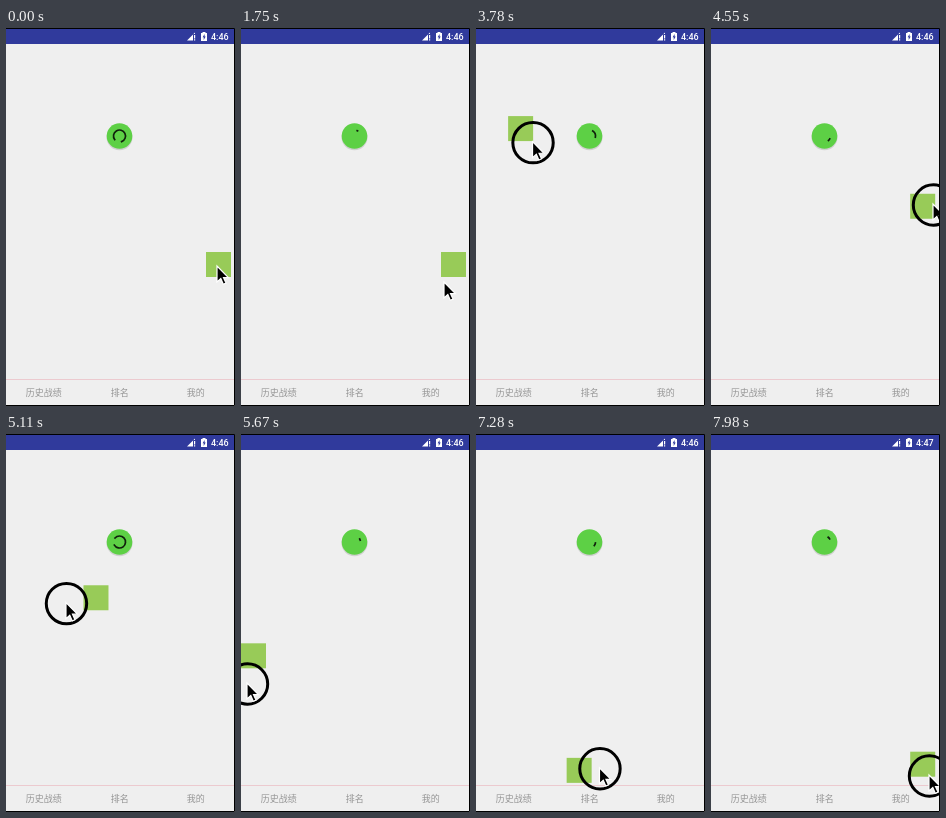
An HTML page that plays this animation: 229 by 378 pixels, repeating every 8 s.

```html
<!DOCTYPE html>
<html lang="zh">
<head>
<meta charset="utf-8">
<style>
  html, body { margin: 0; width: 100%; height: 100%; overflow: hidden; background: #efefef; }
  svg { display: block; width: 229px; height: 378px; }
  .nav { font: 9px "Noto Sans CJK SC", "Noto Sans CJK", sans-serif; fill: #959595; text-anchor: middle; }
  #clock { font: 500 9px Roboto, sans-serif; fill: #fff; }
</style>
</head>
<body>
<svg viewBox="0 0 229 378">
  <rect width="229" height="378" fill="#efefef"/>
  <rect width="229" height="16" fill="#303a9c"/>

  <g fill="#fff">
    <path d="M181 12.5L189 4.5V6H187V12.5Z"/>
    <path d="M188 7h1.2v3.5H188zM188 11.3h1.2v1.2H188z"/>
    <path d="M195 5h1.5V4h3v1h1.5v8h-6z"/>
    <path d="M198.6 6L196.6 9.2h1.1V12l2-3.5h-1.1z" fill="#303a9c"/>
    <text id="clock" x="205" y="12">4:46</text>
  </g>

  <rect y="351" width="229" height="1" fill="#eccacf"/>
  <g class="nav">
    <text x="37.7" y="368">历史战绩</text>
    <text x="113.7" y="368">排名</text>
    <text x="189.7" y="368">我的</text>
  </g>

  <circle cx="113.5" cy="109.2" r="13" fill="#000" opacity=".13"/>
  <circle cx="113.5" cy="108" r="12.8" fill="#5dd045"/>
  <path id="arc" fill="none" stroke="#10200c" stroke-width="1.7" stroke-linecap="square"/>

  <rect id="badge" width="25" height="25" fill="#98cb58"/>
  <circle id="touch" cx=".5" r="20.2" fill="none" stroke="#000" stroke-width="3"/>
  <path id="pointer" d="M0 -1V15L3.8 11.6 6.3 17.3 9 16.1 6.5 10.6H11.4Z" stroke="#fff" stroke-width="1.2"/>

  <path d="M0 .5H228.5V377.5H0" fill="none" stroke="#000"/>
</svg>
<script>
const LOOP = 8000, STEP = 70, PRESS = 2300, LAG = 120, CLOCK_TICK = 7770;
const GRIP = { x: -11, y: -15 };
const RING = { x: 113.5, y: 108, r: 6, cyclesPerMs: 0.00431, restartAt: 1750 };

// Key points of the drag: time, x, y
const drag = [
  [0, 211, 239], [1750, 203, 255], [PRESS, 211, 239], [2940, 137, 197],
  [3600, 41, 102], [4200, 144, 180], [4550, 222, 177], [5040, 75, 167],
  [5400, 20, 197], [5670, 6, 250], [5880, 8, 294], [6530, 22, 338],
  [6650, 15, 352.5], [7700, 195, 325], [7980, 218, 342]
];

const get = id => document.getElementById(id);
const move = (el, x, y) => el.setAttribute('transform', `translate(${x} ${y})`);
const clamp = (v, lo, hi) => Math.min(hi, Math.max(lo, v));

// Smooth curve through the key points
function pointerAt(t) {
  const last = drag.length - 1;
  let i = 0;
  while (i < last - 1 && drag[i + 1][0] < t) i++;
  const a = drag[i], b = drag[i + 1], span = b[0] - a[0], k = (t - a[0]) / span;
  const slope = (n, axis) => {
    const p = drag[Math.max(0, n - 1)], q = drag[Math.min(last, n + 1)];
    return (q[axis] - p[axis]) / (q[0] - p[0]);
  };
  const along = axis => {
    const blend = k * k * (3 - 2 * k);
    return a[axis] + (b[axis] - a[axis]) * blend
      + span * k * (1 - k) * ((1 - k) * slope(i, axis) - k * slope(i + 1, axis));
  };
  return { x: along(1), y: along(2) };
}

// cubic-bezier(.4, 0, .2, 1)
function ease(x) {
  let lo = 0, hi = 1;
  for (let i = 0; i < 20; i++) {
    const s = (lo + hi) / 2, r = 1 - s;
    if (1.2 * r * r * s + 0.6 * r * s * s + s * s * s < x) lo = s; else hi = s;
  }
  return lo * lo * (3 - 2 * lo);
}

// The arc grows for half a cycle, then its tail catches up, while the whole ring turns
function ringPath(phase) {
  const cycle = Math.floor(phase), t = phase - cycle;
  const head = 284 * ease(Math.min(1, t * 2));
  const tail = 284 * ease(Math.max(0, t * 2 - 1));
  const start = 216 * cycle + 291.6 * t + tail - 63;
  const sweep = head - tail + 4;
  const at = deg => {
    const a = deg * Math.PI / 180;
    return `${RING.x + RING.r * Math.cos(a)} ${RING.y + RING.r * Math.sin(a)}`;
  };
  return `M${at(start)}A${RING.r} ${RING.r} 0 ${sweep > 180 ? 1 : 0} 1 ${at(start + sweep)}`;
}

function draw(now) {
  const t = Math.floor(now % LOOP / STEP) * STEP;
  const tip = pointerAt(t);
  const held = pointerAt(Math.max(PRESS, t - LAG));
  move(get('pointer'), tip.x, tip.y);
  move(get('touch'), tip.x, tip.y);
  move(get('badge'), clamp(held.x + GRIP.x, 0, 200), held.y + GRIP.y);
  get('touch').style.display = t >= PRESS ? '' : 'none';
  get('arc').setAttribute('d', ringPath((t - RING.restartAt) * RING.cyclesPerMs));
  get('clock').textContent = t < CLOCK_TICK ? '4:46' : '4:47';
}

const begin = performance.now();
function tick() {
  draw(performance.now() - begin);
  requestAnimationFrame(tick);
}
tick();
</script>
</body>
</html>
```
